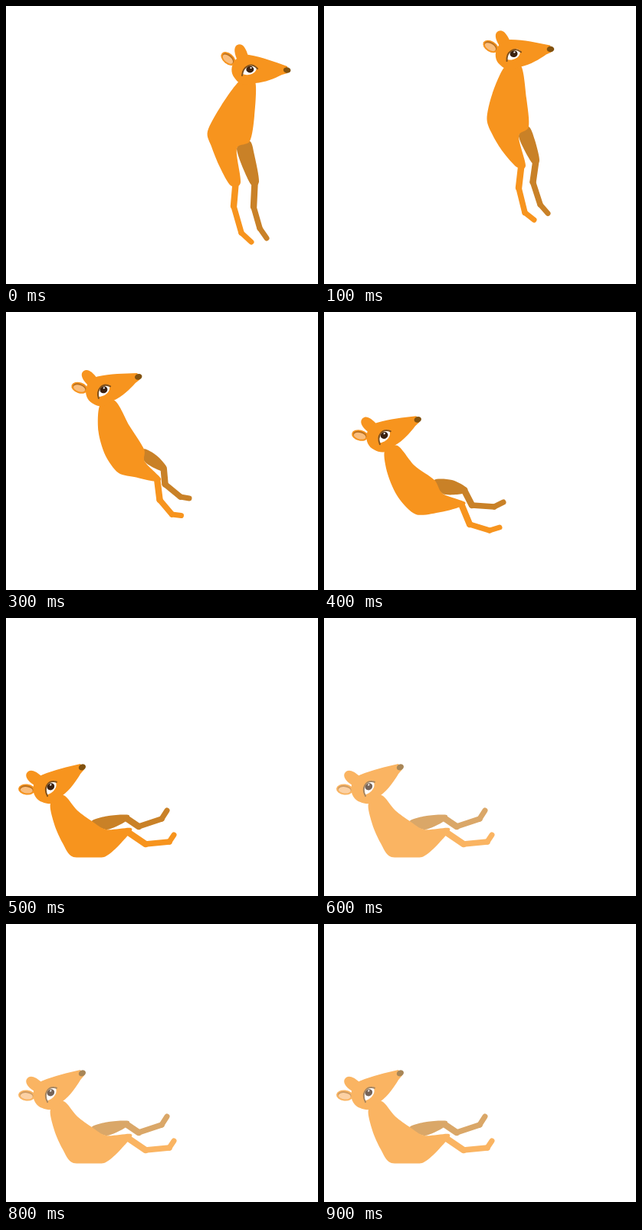
Write an HTML page with a canvas that moves like this. It is 407 px wide and 364 px high and loops after 0.95 s.

```html
<!DOCTYPE html>
<html lang="en">
<head>
<meta charset="utf-8">
<title>Falling deer</title>
<style>
  html, body { margin: 0; height: 100%; overflow: hidden; background: #fff; }
  canvas { display: block; }
</style>
</head>
<body>
<canvas id="stage" width="407" height="364"></canvas>
<script>
const ctx = document.getElementById('stage').getContext('2d');
const ORANGE = '#f7941e', SHADE = '#c98127';

// Each part holds four poses: leap, peak, drop, landed.
const head = [[290, 69, 0], [149, 55, -17], [47, 161.5, -26.4], [27, 224.5, -33]];

// Outline from the nape down the back to the knee, then up the belly.
const body = [
  [306, 97, 281, 130, 263, 164, 268, 184, 279, 211, 293, 235, 306, 231, 301, 187, 318, 177, 324, 144, 325, 99],
  [170, 80, 162, 118, 166, 150, 177, 174, 192, 189, 214, 205, 224, 205, 211, 172, 220, 157, 208, 115, 193, 76],
  [79, 182, 83, 212, 97, 243, 120, 265, 152, 262, 175, 256, 184, 249, 155, 238, 144, 220, 118, 201, 96, 175],
  [58, 243, 63, 270, 74, 295, 88, 313, 128, 313, 157, 287, 163, 275, 131, 277, 112, 266, 93, 252, 75, 232]
];
// Thigh front, outer knee, inner knee.
const backThigh = [
  [324, 195, 330, 230, 319, 233],
  [230, 174, 236, 193, 228, 196],
  [167, 220, 187, 231, 180, 238],
  [134, 259, 160, 258, 155, 267]
];
// Ankle, foot, toe.
const backShin = [
  [323, 263, 331, 291, 340, 304],
  [226, 216, 237, 247, 248, 257],
  [193, 253, 222, 255, 234, 249],
  [173, 273, 203, 263, 210, 252]
];
const frontShin = [
  [297, 262, 307, 297, 320, 309],
  [215, 232, 221, 262, 232, 269],
  [190, 278, 216, 286, 229, 282],
  [182, 296, 213, 293, 219, 284]
];

const skull = new Path2D('M299 71C293 78 293 88 298 94C302 100 307 103 312 103L325 101C338 100 350 95 360 90L367 88L367 79C350 73 335 67 317 64C309 63 303 66 299 71Z');
const farEar = new Path2D('M301 69C297 60 297 52 303 50.5C309 49 313 55 316 66Z');
const eyeWhite = new Path2D('M308 89C310 79 322 74 327 80C327 89 316 92 308 89Z');
const lid = new Path2D('M308 91C309 79 320 73 328 82');

const blend = (poses, i, k) => poses[i].map((v, n) => v + ((poses[i + 1] || poses[i])[n] - v) * k);
const toPoints = a => Array.from({ length: a.length / 2 }, (_, i) => [a[2 * i], a[2 * i + 1]]);
const middle = (p, q) => [(p[0] + q[0]) / 2, (p[1] + q[1]) / 2];

function fillSmooth(points, color) {
  const n = points.length, at = i => points[(i + n) % n];
  ctx.beginPath();
  ctx.moveTo(...points[0]);
  for (let i = 0; i < n; i++) {
    const [a, b, c, d] = [at(i - 1), at(i), at(i + 1), at(i + 2)];
    ctx.bezierCurveTo(b[0] + (c[0] - a[0]) / 7, b[1] + (c[1] - a[1]) / 7,
      c[0] - (d[0] - b[0]) / 7, c[1] - (d[1] - b[1]) / 7, c[0], c[1]);
  }
  ctx.fillStyle = color;
  ctx.fill();
}

function drawShin(points, color) {
  ctx.strokeStyle = color;
  points.slice(1).forEach((p, i) => {
    ctx.lineWidth = [8.5, 7.5, 7][i];
    ctx.beginPath();
    ctx.moveTo(...points[i]);
    ctx.lineTo(...p);
    ctx.stroke();
  });
}

function ellipse(x, y, rx, ry, turn, color) {
  ctx.beginPath();
  ctx.ellipse(x, y, rx, ry, turn, 0, 7);
  ctx.fillStyle = color;
  ctx.fill();
}

function drawHead([x, y, angle]) {
  ctx.save();
  ctx.translate(x, y);
  ctx.rotate(angle * Math.PI / 180);
  ctx.translate(-290, -69);
  ctx.fillStyle = ORANGE;
  ctx.fill(farEar);
  ctx.fill(skull);
  ellipse(290, 69, 11, 7, 0.7, ORANGE);
  ellipse(290, 68.6, 8.8, 5, 0.7, '#b9701f');
  ellipse(289.4, 69.6, 8, 4.2, 0.7, '#fabd7c');
  ctx.fillStyle = '#fff';
  ctx.fill(eyeWhite);
  ellipse(318.3, 83, 5, 4.4, 0, '#3a2110');
  ellipse(319.5, 81, 1.2, 1, 0, '#fff');
  ctx.strokeStyle = '#80501a';
  ctx.lineWidth = 2;
  ctx.stroke(lid);
  ellipse(366.6, 84, 4.8, 3.8, 0.1, '#82520f');
  ctx.restore();
}

function drawDeer(pose, k) {
  const torso = toPoints(blend(body, pose, k));
  const thigh = toPoints(blend(backThigh, pose, k));
  const far = toPoints(blend(backShin, pose, k));
  const near = toPoints(blend(frontShin, pose, k));
  fillSmooth([torso[8], ...thigh, torso[7]], SHADE);
  drawShin([middle(thigh[1], thigh[2]), ...far], SHADE);
  drawShin([middle(torso[5], torso[6]), ...near], ORANGE);
  fillSmooth(torso, ORANGE);
  drawHead(blend(head, pose, k));
}

function render(ms) {
  // 100 ms steps through the fall, then 50 ms steps of blinking.
  const step = ms < 600 ? Math.floor(ms / 100) : 6 + Math.floor((ms - 600) / 50);
  const airborne = step < 5, between = airborne && step % 2;
  ctx.clearRect(0, 0, 407, 364);
  ctx.save();
  ctx.beginPath();
  ctx.rect(0, 0, 407, 313.5);
  ctx.clip();
  ctx.lineCap = ctx.lineJoin = 'round';
  if (between) ctx.translate(-2, -9);
  drawDeer(airborne ? step >> 1 : 3, between ? 0.5 : 0);
  ctx.restore();
  if (step > 5 && step % 2 === 0) {
    ctx.fillStyle = 'rgba(255,255,255,0.3)';
    ctx.fillRect(0, 0, 407, 364);
  }
}

const start = performance.now();
function tick() {
  render((performance.now() - start) % 950);
  requestAnimationFrame(tick);
}
tick();
</script>
</body>
</html>
```
